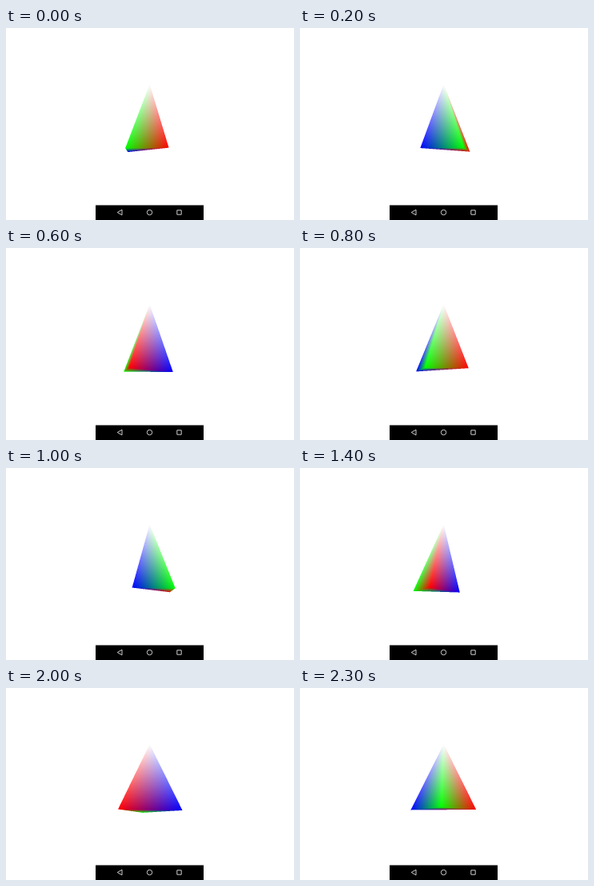
Write an HTML page with a canvas that moves like this. It is 360x240 px and loops after 2400 ms.

```html
<!DOCTYPE html>
<html lang="en">
<head>
<meta charset="utf-8">
<title>Spinning tetrahedron</title>
<style>
html, body { margin: 0; width: 100%; height: 100%; overflow: hidden; background: #fff; }
canvas { display: block; width: 360px; height: 240px; }
</style>
</head>
<body>
<canvas id="stage" width="360" height="240"></canvas>
<script>
const ctx = document.getElementById('stage').getContext('2d');
const STEP = 100, STEPS = 24;
const CX = 179.6, CY = 111.2, SIZE = 41, DEPTH = 0.085;
const BOX = { x: 134, y: 66, w: 92, h: 94 };
const SUB = [0.17, 0.5, 0.83];

// [step, turn in degrees]
const TURN = [[0, -51.5], [4, 133.5], [8, 323], [10, 415], [14, 603], [17, 747.5], [23, 1075]];

const WHITE = [255, 255, 255], RED = [255, 0, 0], GREEN = [0, 255, 0], BLUE = [0, 0, 255];
// Vertices: apex, blue, green, red
const FACES = [[0, 1, 2], [0, 2, 3], [0, 3, 1], [1, 3, 2]];

function turnAt(step) {
  let i = 1;
  while (step > TURN[i][0]) i++;
  const [s0, a0] = TURN[i - 1], [s1, a1] = TURN[i];
  return a0 + (a1 - a0) * (step - s0) / (s1 - s0);
}

function project(x, y, z, rgb) {
  const s = SIZE / (1 + DEPTH * z);
  return { x: CX + x * s, y: CY - y * s, rgb };
}

function corner(deg, rgb) {
  const a = deg * Math.PI / 180;
  return project(Math.sin(a), -1, Math.cos(a), rgb);
}

function cross(a, b, x, y) {
  return (b.x - a.x) * (y - a.y) - (b.y - a.y) * (x - a.x);
}

function colorAt(faces, x, y) {
  for (const { a, b, c, area } of faces) {
    const u = cross(b, c, x, y) / area;
    const v = cross(c, a, x, y) / area;
    const w = 1 - u - v;
    if (u >= 0 && v >= 0 && w >= 0) {
      return a.rgb.map((k, i) => k * u + b.rgb[i] * v + c.rgb[i] * w);
    }
  }
  return WHITE;
}

function drawSolid(step) {
  const turn = turnAt(step);
  const pts = [
    project(0, 1, 0, WHITE),
    corner(turn - 90, BLUE),
    corner(turn, GREEN),
    corner(turn + 90, RED)
  ];
  // The solid shows its inner sides: keep the faces turned away.
  const faces = FACES.map(f => {
    const [a, b, c] = f.map(i => pts[i]);
    return { a, b, c, area: cross(a, b, c.x, c.y) };
  }).filter(f => f.area < 0);

  const img = ctx.createImageData(BOX.w, BOX.h);
  const n = SUB.length * SUB.length;
  let p = 0;
  for (let y = 0; y < BOX.h; y++) {
    for (let x = 0; x < BOX.w; x++) {
      let r = 0, g = 0, b = 0;
      for (const dy of SUB) for (const dx of SUB) {
        const c = colorAt(faces, BOX.x + x + dx, BOX.y + y + dy);
        r += c[0]; g += c[1]; b += c[2];
      }
      img.data[p++] = r / n;
      img.data[p++] = g / n;
      img.data[p++] = b / n;
      img.data[p++] = 255;
    }
  }
  ctx.putImageData(img, BOX.x, BOX.y);
}

function drawBar() {
  const y = 230.5;
  ctx.fillStyle = '#fff';
  ctx.fillRect(0, 0, 360, 240);
  ctx.fillStyle = '#000';
  ctx.fillRect(112, 221.5, 135, 18.5);
  ctx.strokeStyle = '#e4e4e4';
  ctx.lineWidth = 0.9;
  ctx.lineJoin = 'round';
  ctx.beginPath();
  ctx.moveTo(139.2, y);
  ctx.lineTo(145, y - 3.3);
  ctx.lineTo(145, y + 3.3);
  ctx.closePath();
  ctx.stroke();
  ctx.beginPath();
  ctx.arc(179.5, y, 3.2, 0, Math.PI * 2);
  ctx.stroke();
  ctx.strokeRect(213.8, y - 2.7, 5.4, 5.4);
}

let shown = -1;
const start = performance.now();

function tick() {
  const step = Math.floor((performance.now() - start) / STEP) % STEPS;
  if (step !== shown) {
    shown = step;
    drawSolid(step);
  }
  requestAnimationFrame(tick);
}

drawBar();
tick();
</script>
</body>
</html>
```
